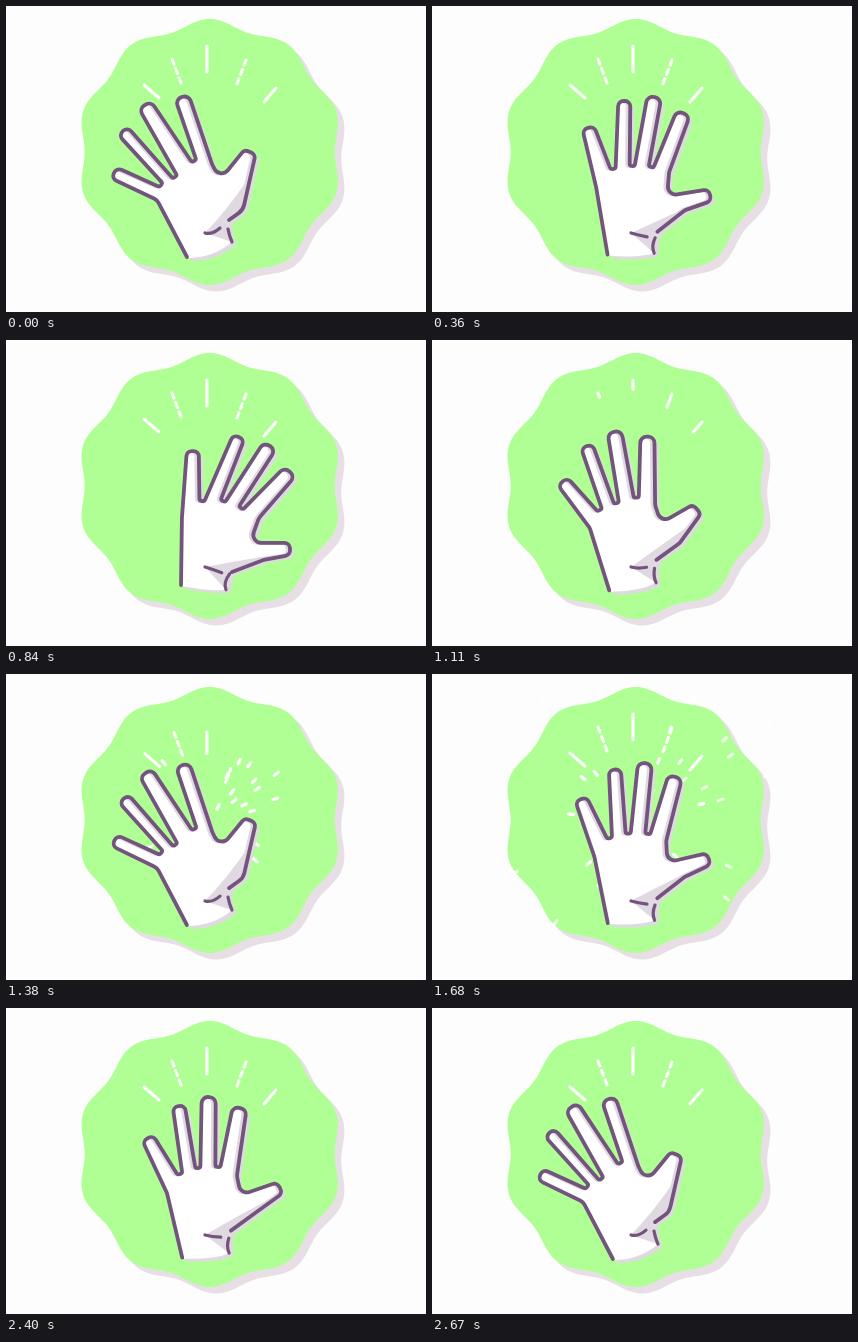
These frames come from a looping animation (420 by 306 pixels, 2.7 s). An HTML page with a canvas:

```html
<!DOCTYPE html>
<html lang="en">
<head>
<meta charset="utf-8">
<title>Waving hand</title>
<style>
  html, body { margin: 0; width: 100%; height: 100%; overflow: hidden; background: #fdfdfd; }
  canvas { display: block; width: 420px; height: 306px; }
</style>
</head>
<body>
<canvas id="stage" width="420" height="306"></canvas>
<script>
const ctx = document.getElementById('stage').getContext('2d');
const LOOP = 2700, WAVE = 1350;
const GREEN = '#b0ff94', SHADOW = '#e8dfe6', INK = '#72547c', SHADE = '#e0d9e2';

// Swing amount, then: wrist side, pinky, gap, ring, gap, middle, gap, index, index base, thumb web, thumb, thumb base
const POSES = [
  [0, [151,194, 108,167, 155,179, 117,125, 169,171, 139,99, 188,155, 176,91, 206,158, 214,174, 244,146, 237,204]],
  [.413, [161,185, 142,130, 174,166, 173,98, 192,160, 203,89, 212,159, 234,100, 231,168, 235,187, 274,180, 252,203]],
  [.552, [164,181, 156,122, 181,163, 192,95, 200,160, 222,91, 219,161, 251,107, 237,166, 235,190, 278,189, 253,204]],
  [.86, [176,178, 187,111, 196,161, 233,97, 217,161, 264,106, 235,168, 284,132, 253,178, 244,203, 284,209, 258,220]],
  [.97, [180,172, 201,109, 205,160, 248,102, 221,161, 277,118, 236,168, 295,146, 256,180, 244,207, 284,219, 262,223]]
];

// x1, y1, x2, y2, number of dashes
const RAYS = [
  [138,79, 153,92, 1], [166,53, 175,77, 3], [201,40, 201,66, 1],
  [240,54, 231,78, 3], [270,82, 258,96, 1]
];

const CENTER = [204, 148];
const BURSTS = [
  { start: 1200, at: 1380, fade: [1640, 1820], dots: [
    -46,-59, 29,-60, 39,-57, 44,-41, 47,-33, 66,-48, 65,-23, 42,-11, 34,-17, 24,-21,
    22,-30, 8,-15, 17,-46, 46,22, 45,38, -70,-8, -60,25, -40,50] },
  { start: 1450, at: 1950, fade: [1830, 2160], dots: [
    -88,-73, -67,-81, -83,-38, -108,-13, -84,-13, -70,-3, -51,43, -79,69, -61,103,
    -34,110, -25,102, -31,-42, -22,-53, 38,-102, 66,57, 109,-30, 110,62] }
];

const clamp = v => Math.max(0, Math.min(1, v));
const ramp = (t, a, b) => clamp((t - a) / (b - a));
const easeOut = (p, n) => 1 - Math.pow(1 - p, n);
const mid = (a, b) => [(a[0] + b[0]) / 2, (a[1] + b[1]) / 2];

function line(x1, y1, x2, y2, color, width) {
  ctx.beginPath();
  ctx.moveTo(x1, y1);
  ctx.lineTo(x2, y2);
  ctx.strokeStyle = color;
  ctx.lineWidth = width;
  ctx.stroke();
}

function badge(dx, dy, color) {
  ctx.beginPath();
  for (let i = 0; i < 360; i++) {
    const a = i * Math.PI / 180;
    const r = 129 + 4 * Math.cos(10 * a);
    ctx.lineTo(203.7 + dx + r * Math.sin(a), 146 + dy - r * Math.cos(a));
  }
  ctx.fillStyle = color;
  ctx.fill();
}

function drawRays(t) {
  RAYS.forEach(([x1, y1, x2, y2, n], i) => {
    const out = ramp(t, 1030 + i * 15, 1110 + i * 15);
    const start = 1260 + i * 38;
    if (out === 1 && t < start) return;
    const len = Math.hypot(x2 - x1, y2 - y1);
    const ux = (x2 - x1) / len, uy = (y2 - y1) / len;
    const grow = t < start ? 1 : easeOut(ramp(t, start, start + 200), 4);
    const shift = 50 * (1 - grow);
    const size = len * (t < start ? 1 - out : .5 + .5 * grow);
    const step = size / (n === 1 ? 1 : n - .45);
    const dash = n === 1 ? size : step * .55;
    for (let k = 0; k < n; k++) {
      const a = shift + k * step, b = a + dash;
      line(x1 + ux * a, y1 + uy * a, x1 + ux * b, y1 + uy * b, '#fff', 3);
    }
  });
}

function drawBurst({ start, at, fade, dots }, t) {
  if (t < start || t > fade[1]) return;
  const travel = time => easeOut(ramp(time, start, start + 700), 2);
  const k = travel(t) / travel(at);
  ctx.globalAlpha = 1 - ramp(t, ...fade);
  for (let i = 0; i < dots.length; i += 2) {
    const x = dots[i], y = dots[i + 1], d = Math.hypot(x, y);
    const a = k - 2.5 / d, b = k + 2.5 / d;
    line(CENTER[0] + x * a, CENTER[1] + y * a, CENTER[0] + x * b, CENTER[1] + y * b, '#fff', 3.2);
  }
  ctx.globalAlpha = 1;
}

// Smooth interpolation through the poses
function poseAt(u) {
  const last = POSES.length - 1;
  let i = 0;
  while (i < last - 1 && u > POSES[i + 1][0]) i++;
  const h = POSES[i + 1][0] - POSES[i][0], s = (u - POSES[i][0]) / h;
  const slope = (j, c) => {
    const a = POSES[Math.max(0, j - 1)], b = POSES[Math.min(last, j + 1)];
    return (b[1][c] - a[1][c]) / (b[0] - a[0]);
  };
  const pts = [];
  for (let c = 0; c < 24; c++) {
    const p = POSES[i][1][c], q = POSES[i + 1][1][c];
    const w = s * s * (3 - 2 * s);
    const v = p + (q - p) * w + h * (slope(i, c) * s * (1 - s) * (1 - s) - slope(i + 1, c) * s * s * (1 - s));
    if (c % 2) pts[c >> 1].push(v); else pts.push([v]);
  }
  return pts;
}

// Two rounded corners forming the end of a finger (side 1) or a gap (side -1)
function cap(tip, from, r, side) {
  const dx = tip[0] - from[0], dy = tip[1] - from[1], d = Math.hypot(dx, dy);
  const px = -dy / d * r * side, py = dx / d * r * side;
  return [[tip[0] - px, tip[1] - py, r * .92], [tip[0] + px, tip[1] + py, r * .92]];
}

function handShape(u) {
  const [side, t1, g1, t2, g2, t3, g3, t4, base, web, thumb, under] = poseAt(u);
  const bend = 1 - (1 - u) * (1 - u);
  const wrist = [175 + 6 * Math.pow(1 - u, 3), 251 - 8 * u * u];
  const heel = [226 - 7 * u, 236 + 14 * bend];
  const crease = [214 + 2 * u, 222 + 11 * bend];
  const end = [223 + 3 * bend, 214 + 21 * u];
  const corners = [
    [...side, 10],
    ...cap(t1, mid(side, g1), 6, 1), ...cap(g1, mid(t1, t2), 2.5, -1),
    ...cap(t2, mid(g1, g2), 6, 1), ...cap(g2, mid(t2, t3), 2.5, -1),
    ...cap(t3, mid(g2, g3), 7, 1), ...cap(g3, mid(t3, t4), 2.5, -1),
    ...cap(t4, mid(g3, base), 7, 1),
    [...base, 14], [...web, 8],
    ...cap(thumb, mid(web, under), 6, 1),
    [...under, 14], end
  ];
  const outline = new Path2D();
  outline.moveTo(...wrist);
  for (let i = 0; i < corners.length - 1; i++) {
    const [x, y, r] = corners[i], next = corners[i + 1];
    outline.arcTo(x, y, next[0], next[1], r);
  }
  outline.lineTo(...end);
  const body = new Path2D(outline);
  body.lineTo(crease[0] + 8, crease[1]);
  body.lineTo(...heel);
  body.quadraticCurveTo(207, 252, wrist[0], wrist[1] + 1);
  body.closePath();
  return { outline, body, heel, crease, end, thumb, under };
}

function drawHand(u) {
  const { outline, body, heel, crease, end, thumb, under } = handShape(u);
  ctx.save();
  ctx.translate(4, 3);
  ctx.fillStyle = SHADE;
  ctx.fill(body);
  ctx.restore();

  ctx.fillStyle = '#fff';
  ctx.fill(body);

  ctx.save();
  ctx.clip(body);
  ctx.fillStyle = SHADE;
  const edge = mid(thumb, under);
  ctx.beginPath();
  ctx.moveTo(...edge);
  ctx.quadraticCurveTo(end[0] - 2, end[1] - 10, 199, 227);
  ctx.lineTo(...heel);
  ctx.lineTo(...end);
  ctx.lineTo(under[0] + 8, under[1] + 8);
  ctx.fill();
  ctx.translate(-2.5, 0);
  ctx.strokeStyle = SHADE;
  ctx.lineWidth = 4;
  ctx.stroke(outline);
  ctx.restore();

  ctx.strokeStyle = INK;
  ctx.lineWidth = 3.8;
  ctx.stroke(outline);
  ctx.lineWidth = 3.2;
  ctx.beginPath();
  ctx.moveTo(199, 227);
  ctx.quadraticCurveTo(206, 229, ...crease);
  ctx.moveTo(...heel);
  ctx.quadraticCurveTo(heel[0] - 3, heel[1] - 7, crease[0] + 8, crease[1] + 1);
  ctx.stroke();
}

function draw(now) {
  const t = now % LOOP;
  const swing = (1 - Math.cos(2 * Math.PI * t / WAVE)) / 2;
  ctx.fillStyle = '#fdfdfd';
  ctx.fillRect(0, 0, 420, 306);
  ctx.lineCap = ctx.lineJoin = 'round';
  badge(6.5, 6.5, SHADOW);
  badge(0, 0, GREEN);
  drawRays(t);
  BURSTS.forEach(b => drawBurst(b, t));
  drawHand(swing);
}

function tick() {
  draw(performance.now());
  requestAnimationFrame(tick);
}
tick();
</script>
</body>
</html>
```
